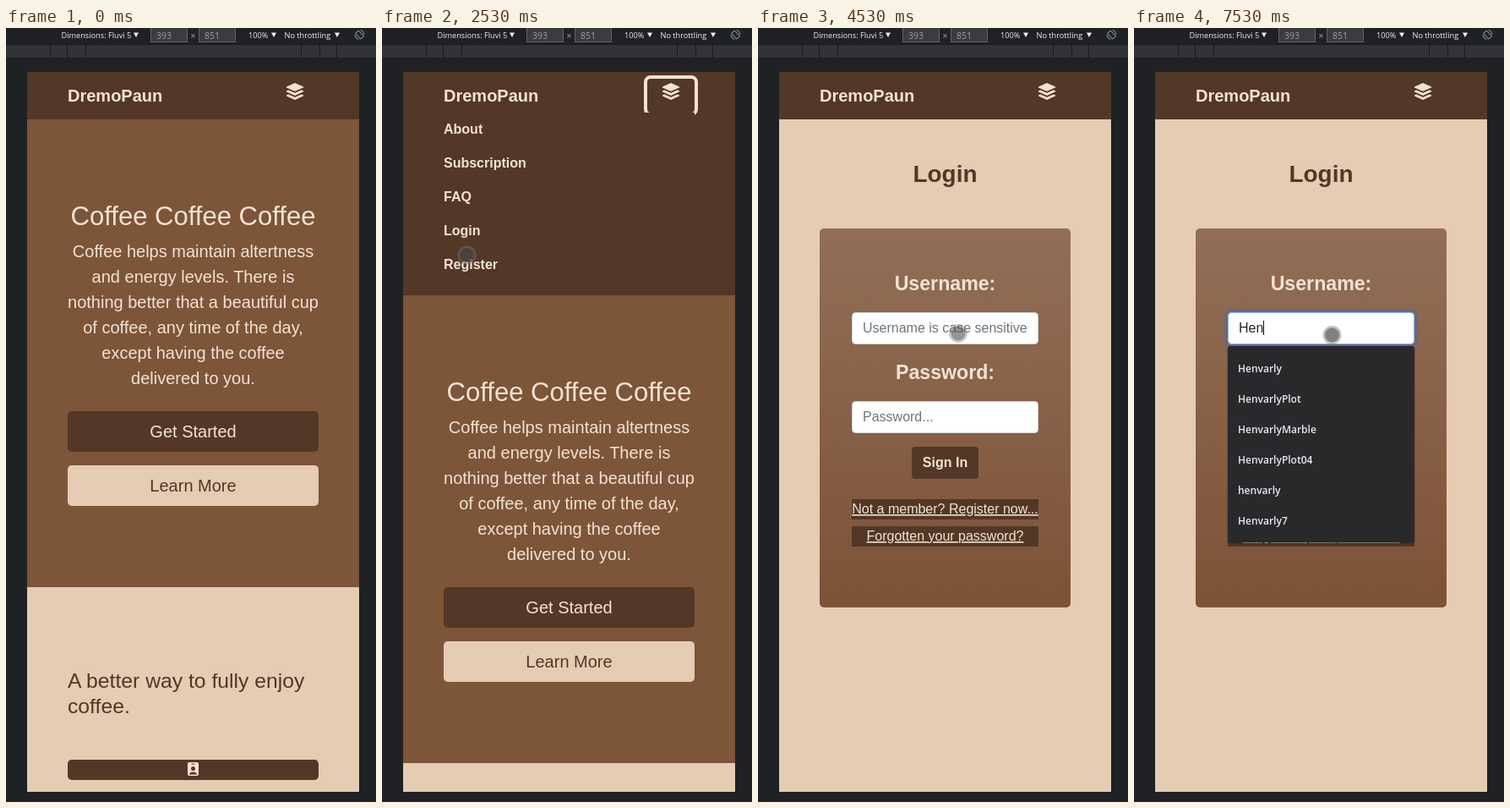
Write an HTML page that moves like this. It is 438x915 px and loops after 8 s.

```html
<!DOCTYPE html>
<html lang="en">
<head>
<meta charset="utf-8">
<title>Coffee shop login</title>
<style>
  html, body { margin: 0; width: 100%; height: 100%; overflow: hidden; background: #202124; }
  #stage { display: block; font: 16px "Liberation Sans", Arial, sans-serif; }
  .ui { font: 9.2px "Open Sans", "Noto Sans", sans-serif; fill: #f1f1f1; }
  .size { fill: #9aa0a6; font-size: 10.5px; }
  .mid { text-anchor: middle; }
  .bold { font-weight: 700; }
  .lead { font-size: 20px; }
  .h1 { font-size: 27.9px; }
  .h2 { font-size: 24.74px; }
  .h3 { font-size: 23.16px; }
  .hero { font-size: 31.05px; }
  .link { text-decoration: underline; }
  .light { fill: #f2e3d3; }
  .dark { fill: #533727; }
  .brown { fill: #7d5539; }
  .cream { fill: #e5ccb3; }
  .hint { fill: #6c757d; }
  .field { fill: #fff; stroke: #ced4da; }
  #list { font: 600 12px "Open Sans", "Noto Sans", sans-serif; fill: #e8eaed; }
</style>
</head>
<body>
<svg id="stage" width="438" height="915" viewBox="0 0 438 915">
  <!-- device toolbar -->
  <g class="ui">
    <rect y="20" width="438" height="15" fill="#323337"/>
    <path d="M0 19.5H438M52.5 20V35M72.5 20V35M94.5 20V35M349.5 20V35M371.5 20V35M391.5 20V35" stroke="#18191b"/>
    <g fill="#3b3b3d" stroke="#626366">
      <rect x="171.5" y="-.5" width="43" height="17"/>
      <rect x="228.5" y="-.5" width="43" height="17"/>
    </g>
    <text x="65.5" y="12">Dimensions: Fluvi 5</text>
    <text x="287" y="12">100%</text>
    <text x="329.5" y="12">No throttling</text>
    <path d="M151 5.5h6l-3 5.5zM314 5.5h6l-3 5.5zM389 5.5h6l-3 5.5z"/>
    <text class="size" x="178" y="12.5">393</text>
    <text class="size" x="218.5" y="12.5">×</text>
    <text class="size" x="235" y="12.5">851</text>
    <g fill="none" stroke="#9aa0a6">
      <rect x="416" y="3.5" width="5" height="9" rx="1" transform="rotate(-45 418.5 8)"/>
      <path d="M419.5 2.5a5.5 5.5 0 0 1 4.5 5M417.5 13.5a5.5 5.5 0 0 1-4.5-5"/>
    </g>
  </g>

  <svg x="25" y="52" width="393" height="851" viewBox="25 52 393 851">
    <rect class="cream" x="25" y="52" width="393" height="851"/>

    <g id="home">
      <rect class="brown" x="25" y="108" width="393" height="553"/>
      <g class="mid light lead">
        <text class="hero" x="221.5" y="233">Coffee Coffee Coffee</text>
        <text x="221.5" y="271">Coffee helps maintain altertness</text>
        <text x="221.5" y="301">and energy levels. There is</text>
        <text x="221.5" y="331">nothing better that a beautiful cup</text>
        <text x="221.5" y="361">of coffee, any time of the day,</text>
        <text x="221.5" y="391">except having the coffee</text>
        <text x="221.5" y="421">delivered to you.</text>
        <rect class="dark" x="73" y="453" width="297" height="48" rx="4.8"/>
        <text x="221.5" y="484">Get Started</text>
        <rect class="cream" x="73" y="517" width="297" height="48" rx="4.8"/>
        <text class="dark" x="221.5" y="548">Learn More</text>
      </g>
      <g class="dark h2">
        <text x="73" y="780">A better way to fully enjoy</text>
        <text x="73" y="810">coffee.</text>
      </g>
      <rect class="dark" x="73" y="865" width="297" height="24" rx="4.8"/>
      <rect class="light" x="215" y="868" width="13" height="16" rx="2"/>
      <path class="dark" d="M219.5 869.5h4v1h-4zM217 882.5c0-4 9-4 9 0z"/>
      <circle class="dark" cx="221.5" cy="875.5" r="2.5"/>
    </g>

    <g id="login">
      <text class="mid bold dark h1" x="221.5" y="182">Login</text>
      <linearGradient id="card" x2="0" y2="1">
        <stop stop-color="#926e57"/><stop offset="1" stop-color="#7d5237"/>
      </linearGradient>
      <rect x="73" y="237" width="297" height="448" rx="5" fill="url(#card)"/>
      <g class="mid bold light">
        <text class="h3" x="221.5" y="310">Username:</text>
        <text class="h3" x="221.5" y="415">Password:</text>
        <rect class="dark" x="182" y="495" width="79" height="38" rx="4"/>
        <text x="221.5" y="519">Sign In</text>
      </g>
      <rect id="glow" x="107" y="332" width="229" height="46" rx="8" fill="#0d6efd" fill-opacity=".25"/>
      <rect id="user" class="field" x="111.5" y="336.5" width="220" height="37" rx="4"/>
      <rect class="field" x="111.5" y="441.5" width="220" height="37" rx="4"/>
      <text id="hint" class="hint" x="124" y="360">Username is case sensitive</text>
      <text id="typed" x="124" y="360" fill="#212529"></text>
      <rect id="caret" y="346" width="1" height="17" fill="#111"/>
      <text class="hint" x="124" y="465">Password...</text>
      <rect class="dark" x="111" y="557" width="221" height="24"/>
      <rect class="dark" x="111" y="589" width="221" height="24"/>
      <g class="mid light link">
        <text x="221.5" y="574">Not a member? Register now...</text>
        <text x="221.5" y="606">Forgotten your password?</text>
      </g>
      <g id="drop">
        <rect x="111" y="376" width="221" height="232" rx="3" fill="#29292b"
              style="filter:drop-shadow(0 1px 1px #0006)"/>
        <g id="list"></g>
      </g>
    </g>

    <rect id="nav" class="dark" x="25" y="52" width="393" height="56"/>
    <text class="bold light lead" x="73" y="87">DremoPaun</text>
    <g id="menu" class="bold light">
      <rect x="312" y="58" width="60" height="44" rx="6" fill="none" stroke="#f2e3d3" stroke-width="4"/>
      <rect class="dark" x="73" y="100" width="297" height="208"/>
      <text x="73" y="125">About</text>
      <text x="73" y="165">Subscription</text>
      <text x="73" y="205">FAQ</text>
      <text x="73" y="245">Login</text>
      <text x="73" y="285">Register</text>
    </g>
    <path class="light" stroke="#f2e3d3" stroke-linejoin="round"
          d="M342 65.5l10 4.4-10 4.4-10-4.4zM332 74.8l2.2-1 7.8 3.5 7.8-3.5 2.2 1-10 4.6zM332 79.9l2.2-1 7.8 3.5 7.8-3.5 2.2 1-10 4.6z"/>
    <g id="arrival">
      <rect x="411" y="56" width="3" height="695" rx="1" fill="#8a7a6c" fill-opacity=".6"/>
      <path d="M102 239.5v16l3.7-3.4 2.6 5.8 2.6-1.1-2.6-5.7h4.8z" fill="#fff" stroke="#111"/>
    </g>
  </svg>

  <g id="touch">
    <circle r="11" fill="#787878" fill-opacity=".45"/>
    <circle r="8.5" fill="#282828" fill-opacity=".42"/>
  </g>
</svg>

<script>
const el = id => document.getElementById(id);
const show = (id, on) => { el(id).style.display = on ? "" : "none"; };

// [time, x, y]; no position means the pointer is hidden
const touches = [
  [0], [500, 310.5, 178.5], [1000, 347.5, 76.5], [1510, 343.5, 81],
  [2030, 174.5, 101.5], [2530, 100.5, 268.5], [3030, 93.5, 234.5],
  [3530, 101.5, 239], [4040], [4530, 237, 361], [5530, 234.5, 363]
];
const accounts = ["DemoProfile7", "cliffdraft04", "Henvarly", "tile58@example.com", "chiefkeeper", "chiefdraft"];
const matches = ["Henvarly", "HenvarlyPlot", "HenvarlyMarble", "HenvarlyPlot04", "henvarly", "Henvarly7"];

const rows = accounts.map((_, i) => {
  const row = document.createElementNS("http://www.w3.org/2000/svg", "text");
  row.setAttribute("x", 123);
  row.setAttribute("y", 407 + 36 * i);
  return el("list").appendChild(row);
});

function draw(t) {
  const login = t >= 4040, menu = t >= 1510 && !login;
  const focus = t >= 5530, typing = t >= 6540;
  show("home", !login);
  show("login", login);
  show("menu", menu);
  show("arrival", login && t < 4530);
  el("home").setAttribute("transform", `translate(0 ${menu ? 208 : 0})`);
  el("nav").setAttribute("height", menu ? 264 : 56);

  show("drop", t >= 5030);
  show("glow", focus);
  el("user").style.stroke = focus ? "#86b7fe" : "";
  show("hint", !typing);
  el("typed").textContent = t >= 7530 ? "Hen" : typing ? "H" : "";
  show("caret", t >= 5030 && !(t >= 7040 && t < 7530));
  el("caret").setAttribute("x", t >= 7530 ? 153 : typing ? 135 : 124);
  rows.forEach((row, i) => { row.textContent = (typing ? matches : accounts)[i]; });

  const [, x, y] = touches.findLast(step => t >= step[0]);
  show("touch", x);
  if (x) el("touch").setAttribute("transform", `translate(${x} ${y})`);
  el("touch").setAttribute("opacity", t >= 4530 && t < 6040 ? .85 : 1);
}

function tick() {
  draw(performance.now() % 8000);
  requestAnimationFrame(tick);
}
tick();
</script>
</body>
</html>
```
